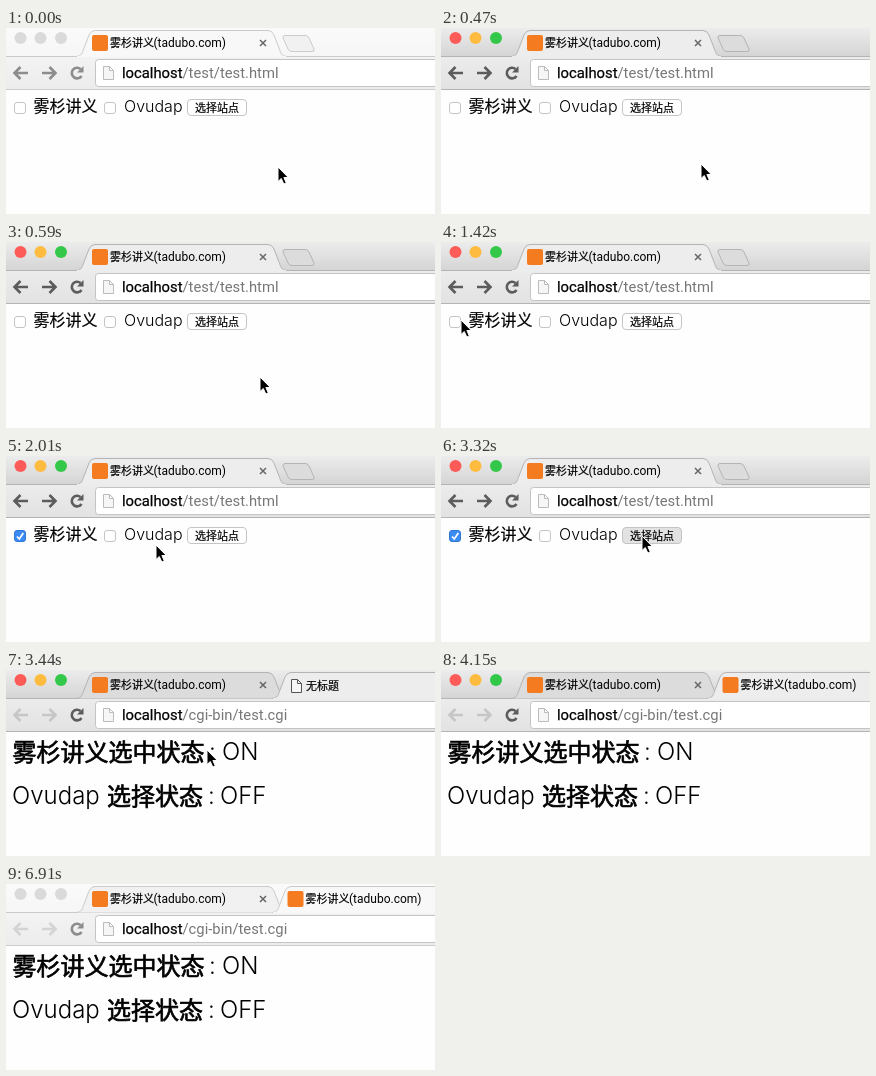
Write an HTML page that moves like this. It is 429 px wide and 186 px high and loops after 7.01 s.

```html
<!DOCTYPE html>
<html lang="zh">
<head>
<meta charset="utf-8">
<title>CGI checkbox demo</title>
<style>
  html, body { margin: 0; height: 100%; overflow: hidden; background: #fefefe; }
  svg { display: block; width: 100vw; height: 100vh;
    --strip1: #ececec; --strip2: #d4d4d4; --bar1: #ececec; --bar2: #e2e2e2;
    --tab: #ededed; --back: #dcdcdc; --edge: #b4b4b4; --nav: #5c5c5c; --faint: #c6c6c6; }
  svg.idle { --strip1: #fafafa; --strip2: #f6f6f6; --bar1: #f3f3f3; --bar2: #ececec;
    --tab: #f8f8f8; --back: #f1f1f1; --edge: #cbcbcb; --nav: #8c8c8c; --faint: #d4d4d4; }
  text { font-family: Roboto, sans-serif; white-space: pre; }
  .cjk { font-family: "Noto Sans CJK SC", "Noto Sans CJK", sans-serif; stroke: #000; stroke-width: .2; }
  .geo { font-family: Inter, sans-serif; font-weight: 300; }
  .small { font-size: 11px; }
  .body { font-size: 16px; }
  .big { font-size: 24px; }
  .big.cjk { stroke-width: .7; }
  .url { font-size: 14.8px; }
  .host { stroke: #000; stroke-width: .25; }
  .path { fill: #777; }
  .edge { stroke: var(--edge); }
  .nav { fill: none; stroke: var(--nav); stroke-width: 2.6; }
  .idle .light { fill: #dadada; }
  .box { fill: #fff; stroke: #c4c4c4; }
  .checked #box1 { fill: #3b8cf2; stroke: #2f78d8; }
  #tick, .result, .loaded .blank, svg:not(.loaded) .ready { display: none; }
  .checked #tick { display: inline; }
  .done .result { display: inline; }
  .done .form { display: none; }
  .done .arrows { stroke: var(--faint); }
  .done #tab1 { fill: var(--back); }
  .pressed #button { fill: #e2e2e2; }
</style>
</head>
<body>
<svg id="stage" viewBox="0 0 429 186" preserveAspectRatio="none">
  <defs>
    <linearGradient id="strip" x2="0" y2="1">
      <stop style="stop-color:var(--strip1)"/><stop offset="1" style="stop-color:var(--strip2)"/>
    </linearGradient>
    <linearGradient id="bar" x2="0" y2="1">
      <stop style="stop-color:var(--bar1)"/><stop offset="1" style="stop-color:var(--bar2)"/>
    </linearGradient>
    <path id="tabShape" d="M70 28.5C76 28 76 25 78 20L83 7Q85 2.5 89 2.5H262Q266 2.5 268 7L273 20C275 25 275 28 281 28.5"/>
    <path id="sheet" d="M.5 .5H6.5L10.5 4.5V13.5H.5ZM6.5 .5V4.5H10.5" fill="#f6f6f6"/>
    <g id="title">
      <rect x="86" y="7" width="16" height="16" rx="2" fill="#f47b20"/>
      <text class="small cjk" x="104" y="19">雾杉讲义</text>
      <text x="147.5" y="19" font-size="12">(tadubo.com)</text>
    </g>
  </defs>

  <rect width="429" height="186" fill="#fefefe"/>
  <rect width="429" height="29" fill="url(#strip)"/>
  <circle class="light" cx="14.5" cy="10" r="6" fill="#fc5b57"/>
  <circle class="light" cx="34.5" cy="10" r="6" fill="#fdbc40"/>
  <circle class="light" cx="55" cy="10" r="6" fill="#34c84a"/>
  <path class="form edge" d="M279 7.5H299Q302 7.5 303 10L308 21Q309 23.5 306 23.5H286Q283 23.5 282 21L277 10Q276.5 7.5 279 7.5Z" fill="var(--back)"/>

  <rect y="28" width="429" height="34" fill="url(#bar)"/>
  <path class="edge" d="M0 28.5H429M0 61.5H429"/>
  <use id="tab1" class="edge" href="#tabShape" fill="var(--tab)"/>
  <path class="form" d="M71 28.5H280" stroke="var(--tab)"/>
  <use href="#title"/>
  <path d="M254 12l6 6m0-6l-6 6" stroke="#666" stroke-width="1.5"/>
  <g class="result">
    <use class="edge" href="#tabShape" x="196" fill="var(--tab)"/>
    <path d="M267 28.5H429" stroke="var(--tab)"/>
    <g class="blank">
      <use href="#sheet" x="285" y="9" stroke="#555"/>
      <text class="small cjk" x="300" y="20">无标题</text>
    </g>
    <use class="ready" href="#title" x="195.5"/>
  </g>

  <path class="nav arrows" d="M22 45H9M14.5 39L8.5 45L14.5 51M36 45H49M43.5 39L49.5 45L43.5 51"/>
  <path class="nav" d="M75.5 48A5.3 5.3 0 1 1 74.5 41"/>
  <path d="M77.5 38V44.5H71Z" fill="var(--nav)"/>
  <rect x="89.5" y="31.5" width="350" height="27" rx="3" fill="#fff" stroke="#c4c4c4"/>
  <use href="#sheet" x="97" y="38" stroke="#bbb"/>
  <text class="url" x="116" y="50"><tspan class="host">localhost</tspan><tspan class="path" id="path"></tspan></text>

  <g class="form">
    <rect id="box1" class="box" x="8.5" y="74.5" width="11" height="11" rx="2.5"/>
    <path id="tick" d="M11 80.5L13.3 83L17.3 77" fill="none" stroke="#fff" stroke-width="1.7"/>
    <text class="body cjk" x="27.5" y="84">雾杉讲义</text>
    <rect class="box" x="98.5" y="74.5" width="11" height="11" rx="2.5"/>
    <text class="body geo" x="118" y="83.5">Ovudap</text>
    <rect id="button" class="box" x="181.5" y="71.5" width="59" height="16" rx="3.5"/>
    <text class="small cjk" x="189" y="84">选择站点</text>
  </g>

  <g class="result">
    <text class="big cjk" x="6.5" y="91">雾杉讲义选中状态</text>
    <text class="big geo" x="203" y="90">:</text>
    <text class="big geo" x="216" y="90">ON</text>
    <text class="big geo" x="6" y="134">Ovudap</text>
    <text class="big cjk" x="101" y="135">选择状态</text>
    <text class="big geo" x="202" y="134">:</text>
    <text class="big geo" x="214" y="134">OFF</text>
  </g>

  <path id="cursor" d="M0 0V14.5L3.3 11.5L5.8 17L8.3 16L5.9 10.5H10.3Z" stroke="#fff"/>
</svg>
<script>
  const LOOP = 7010;
  const $ = id => document.getElementById(id);
  const stage = $('stage'), cursor = $('cursor'), path = $('path');

  // The pointer jumps to each position: time, x, y
  const moves = [
    [0, 272, 139], [240, 270, 138], [360, 266, 137], [470, 260, 136], [590, 254, 135], [710, 246, 134],
    [830, 228, 129], [940, 186, 116], [1060, 130, 100], [1180, 74, 84], [1300, 32, 71], [1420, 20, 78], [1530, 17, 77],
    [1770, 30, 80], [1890, 80, 86], [2010, 150, 89], [2130, 217, 89], [2250, 209, 85], [2370, 205, 83], [2490, 201, 80],
    [3560, 205, 82], [3680, 225, 92], [3790, 275, 115], [3910, 351, 145], [4030, 412, 176], [4150, 450, 200]
  ];

  function draw(now) {
    const t = now % LOOP;
    const set = (name, on) => stage.classList.toggle(name, on);
    const done = t >= 3330;
    set('idle', t < 120 || t >= 6910);
    set('checked', t >= 1650);
    set('pressed', t >= 3210);
    set('done', done);
    set('loaded', t >= 3680);
    path.textContent = done ? '/cgi-bin/test.cgi' : '/test/test.html';
    const [, x, y] = moves.findLast(m => m[0] <= t);
    cursor.setAttribute('transform', `translate(${x} ${y})`);
  }

  const start = performance.now();
  function tick() {
    draw(performance.now() - start);
    requestAnimationFrame(tick);
  }
  tick();
</script>
</body>
</html>
```
